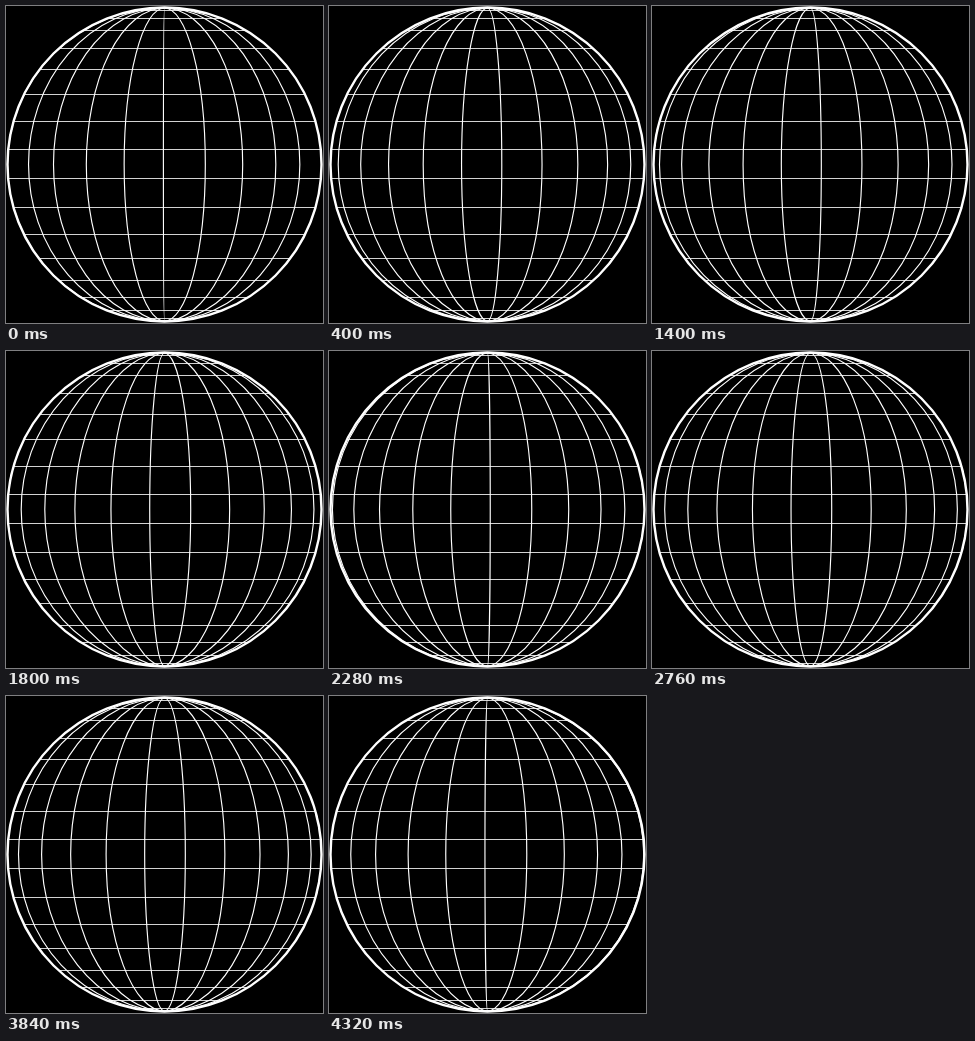
An HTML page without scripts that plays this animation: 317 by 317 pixels, repeating every 4360 ms.

```html
<!DOCTYPE html>
<html lang="en">
<head>
<meta charset="utf-8">
<title>Turning globe</title>
<style>
  @property --turn { syntax: "<number>"; inherits: true; initial-value: 0; }
  @property --wrap { syntax: "<number>"; inherits: true; initial-value: 0; }

  html, body { margin: 0; width: 100%; height: 100%; overflow: hidden; background: #000; }

  svg {
    display: block;
    width: 100%;
    height: 100%;
    fill: none;
    stroke: #fff;
    animation: turn 4360ms steps(109) -1ms infinite, wrap 4360ms step-end -1ms infinite;
  }

  /* four passes per loop; turn - wrap is the progress of the current pass */
  @keyframes turn { from { --turn: 0; } to { --turn: 4; } }
  @keyframes wrap {
    0% { --wrap: 0; }
    25.685% { --wrap: 1; }
    50.457% { --wrap: 2; }
    75.227% { --wrap: 3; }
    100% { --wrap: 4; }
  }

  /* each meridian glides from its place (--a) to its neighbour's (--b) */
  .meridians use {
    transform: scaleX(calc(var(--a) + (var(--b) - var(--a)) * (var(--turn) - var(--wrap))));
  }
  .meridians { stroke-width: 1.15; }
  .parallels { stroke: #d2d2d2; stroke-width: 1; }
  .rim { stroke-width: 2.4; }
</style>
</head>
<body>
<svg viewBox="0 0 317 317">
  <defs>
    <clipPath id="disc"><circle cx="158.5" cy="158.5" r="157"/></clipPath>
    <path id="arc" d="M0-156.5A157 156.5 0 0 1 0 156.5" vector-effect="non-scaling-stroke"/>
  </defs>

  <path class="parallels" clip-path="url(#disc)" d="M0 4.5H317M0 12.5H317M0 24.5H317M0 42.5H317M0 63.5H317M0 88.5H317M0 115.5H317M0 143.5H317M0 172.5H317M0 201.5H317M0 228.5H317M0 252.5H317M0 274.5H317M0 291.5H317M0 304.5H317M0 312.5H317"/>

  <g class="meridians" transform="translate(158.5 158.5)">
    <use href="#arc" style="--a:-1;--b:-.866"/>
    <use href="#arc" style="--a:-.866;--b:-.707"/>
    <use href="#arc" style="--a:-.707;--b:-.498"/>
    <use href="#arc" style="--a:-.498;--b:-.257"/>
    <use href="#arc" style="--a:-.257;--b:-.007"/>
    <use href="#arc" style="--a:-.007;--b:.26"/>
    <use href="#arc" style="--a:.26;--b:.498"/>
    <use href="#arc" style="--a:.498;--b:.709"/>
    <use href="#arc" style="--a:.709;--b:.862"/>
    <use href="#arc" style="--a:.862;--b:1"/>
  </g>

  <circle class="rim" cx="158.5" cy="158.5" r="157"/>
</svg>
</body>
</html>
```
